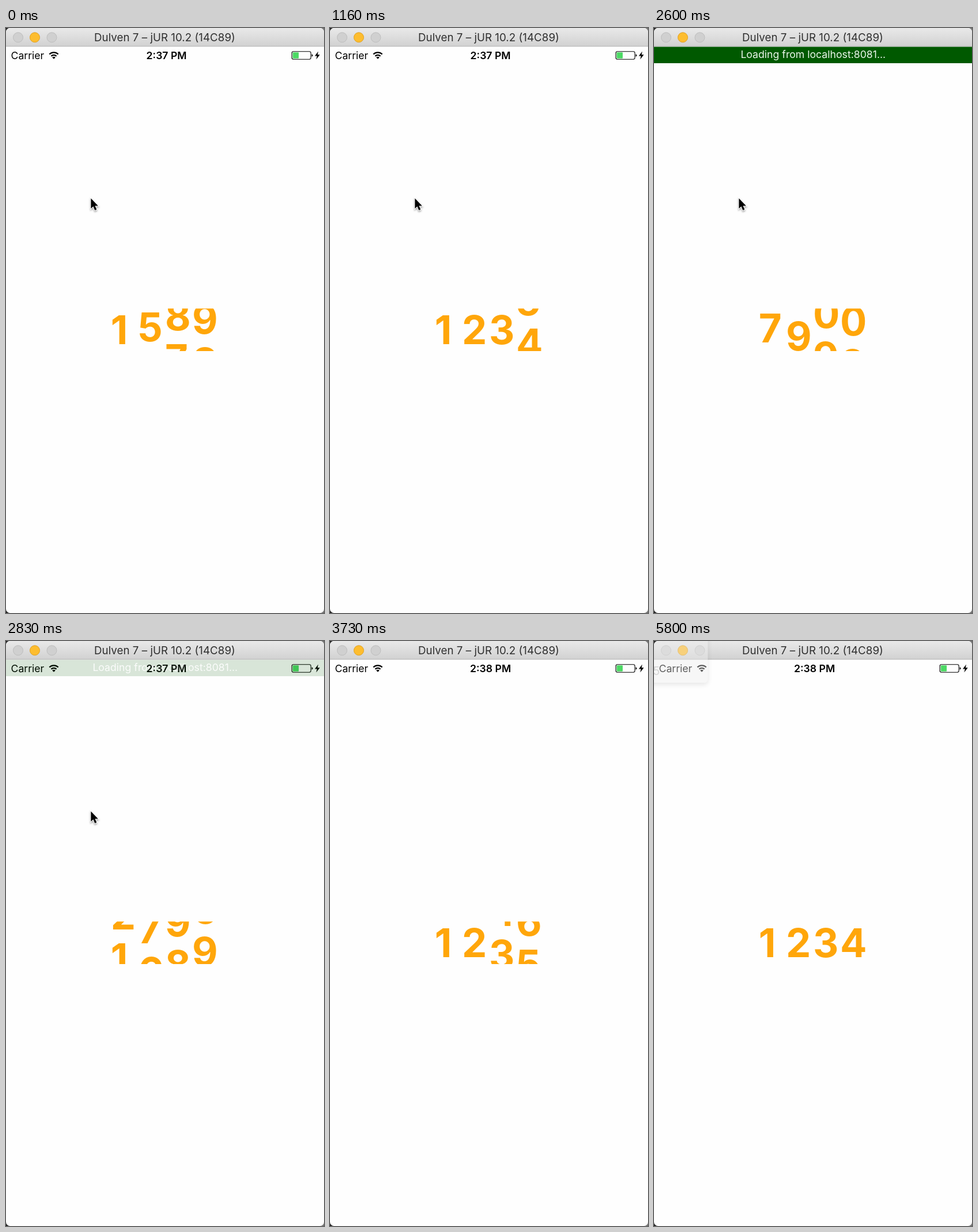
An HTML page that plays this animation: 552 by 1014 pixels, repeating every 5860 ms.

```html
<!DOCTYPE html>
<html lang="en">
<head>
<meta charset="utf-8">
<title>Rolling digits</title>
<style>
  html, body { margin: 0; width: 100%; height: 100%; overflow: hidden; background: linear-gradient(90deg, #222, #777); }
  svg { display: block; width: 552px; height: 1014px; font: 17.66px Inter, sans-serif; }
  .mid { text-anchor: middle; }
  #reels { font-size: 68.8px; font-weight: 700; fill: #ffa60a; }
  #panel { filter: drop-shadow(0 3px 4px rgba(0, 0, 0, .25)); }
</style>
</head>
<body>
<svg viewBox="0 0 552 1014">
  <defs>
    <linearGradient id="chrome" x2="0" y2="1">
      <stop stop-color="#e9e9e9"/><stop offset="1" stop-color="#d1d1d1"/>
    </linearGradient>
    <clipPath id="window"><rect width="552" height="1014" rx="7"/></clipPath>
    <clipPath id="slot"><rect x="180" y="486.3" width="192" height="73.6"/></clipPath>
  </defs>
  <g clip-path="url(#window)">
    <rect width="552" height="1014" fill="#fefefe"/>
    <rect width="552" height="32" fill="url(#chrome)"/>
    <rect y="31.3" width="552" height="1" fill="#b4b4b4"/>
    <g fill="#d0d0d0" stroke="#bcbcbc">
      <circle cx="21" cy="16.3" r="8.5"/>
      <circle cx="50" cy="16.3" r="8.5" fill="#fdbd2f" stroke="#dfa023"/>
      <circle cx="79.5" cy="16.3" r="8.5"/>
    </g>
    <text class="mid" x="275.5" y="23" font-size="18.8" fill="#303030">Dulven 7 – jUR 10.2 (14C89)</text>

    <text x="8.5" y="54">Carrier</text>
    <g fill="none" stroke="#000" stroke-width="2.3">
      <path d="M75.3 45.5a11 11 0 0 1 15.4 0M78.4 48.8a6.6 6.6 0 0 1 9.2 0"/>
      <path d="M83 53.8l-2.8-2.9a3.9 3.9 0 0 1 5.6 0z" fill="#000" stroke="none"/>
    </g>
    <text id="clock" class="mid" x="278.6" y="54" font-weight="600"></text>
    <rect x="496.2" y="40.8" width="33" height="13.4" rx="2.6" fill="none" stroke="#000" stroke-width="1.1"/>
    <rect x="497.7" y="42.3" width="10.4" height="10.4" rx="1" fill="#4cd964"/>
    <path d="M530.6 45.2q2 .4 2 2.3t-2 2.3z"/>
    <path d="M542 40.5l-6 8h3.8l-1.4 6 6.4-8.2h-4z"/>

    <g id="bar">
      <rect y="32.6" width="552" height="28.4" fill="#005900"/>
      <text class="mid" x="276.3" y="52.3" fill="#edf6ed">Loading from localhost:8081...</text>
    </g>

    <g id="reels" clip-path="url(#slot)"></g>

    <path id="cursor" d="M0 0v17.6l4-3.6 2.9 6.6 3.1-1.3-2.9-6.4h5.4z" stroke="#fff" stroke-width="2.2"
      paint-order="stroke" style="filter: drop-shadow(0 2px 1.5px rgba(0, 0, 0, .35))"/>

    <g id="panel">
      <rect x="-20" y="-20" width="113.5" height="92.5" rx="6" fill="#ededed"/>
      <text x="10" y="59" font-size="20" text-anchor="end" fill="#9a9a9a">5</text>
    </g>
  </g>
</svg>
<script>
const LOOP = 5860, PITCH = 73.6, TARGETS = [1, 2, 3, 4];
const $ = id => document.getElementById(id);
const clamp = x => Math.min(1, Math.max(0, x));
const show = (id, opacity) => $(id).setAttribute('opacity', opacity);
const move = (el, x, y) => el.setAttribute('transform', `translate(${x} ${y})`);

// Each reel stacks 0 to 9 upwards, then 0 again.
$('reels').innerHTML = TARGETS.map(() => '<g>' + Array.from({ length: 11 }, (_, d) =>
  `<text y="${548.3 - d * PITCH}">${d % 10}</text>`).join('') + '</g>').join('');
const reels = [...$('reels').children];

const easeInOut = x => x < .5 ? (2 * x) ** 1.65 / 2 : 1 - (2 - 2 * x) ** 1.65 / 2;

// Roll clock after the reload: [time, elapsed ms].
const PACE = [[2330, 0], [2600, 196], [3130, 772], [3730, 1343], [4390, 2000]];
function elapsed(t) {
  if (t < 1930) return t + 585;
  const i = PACE.findIndex(p => p[0] > t);
  if (i < 0) return 2000;
  if (i === 0) return 0;
  const [t0, e0] = PACE[i - 1], [t1, e1] = PACE[i];
  return e0 + (e1 - e0) * (t - t0) / (t1 - t0);
}

function draw(t) {
  const e = elapsed(t);
  reels.forEach((reel, i) => {
    const k = easeInOut(clamp(e / (500 * (i + 1))));
    move(reel, 181.8 + 47.1 * i, (10 + (TARGETS[i] - 10) * k) * PITCH);
  });
  show('reels', t >= 1930 && t < 2330 ? 0 : 1);
  show('bar', t < 1960 ? 0 : clamp((2860 - t) / 200));
  $('clock').textContent = t < 3330 ? '2:37 PM' : '2:38 PM';

  const exit = clamp((t - 3230) / 270) ** 1.5;
  move($('cursor'), 147.4 - 165 * exit, 295.3 - 255 * exit);
  show('cursor', t < 3500 ? 1 : 0);

  show('panel', t < 4860 ? 0 : .95 - .55 * clamp((t - 5670) / 130));
}

function tick() {
  draw(performance.now() % LOOP);
  requestAnimationFrame(tick);
}
tick();
</script>
</body>
</html>
```
